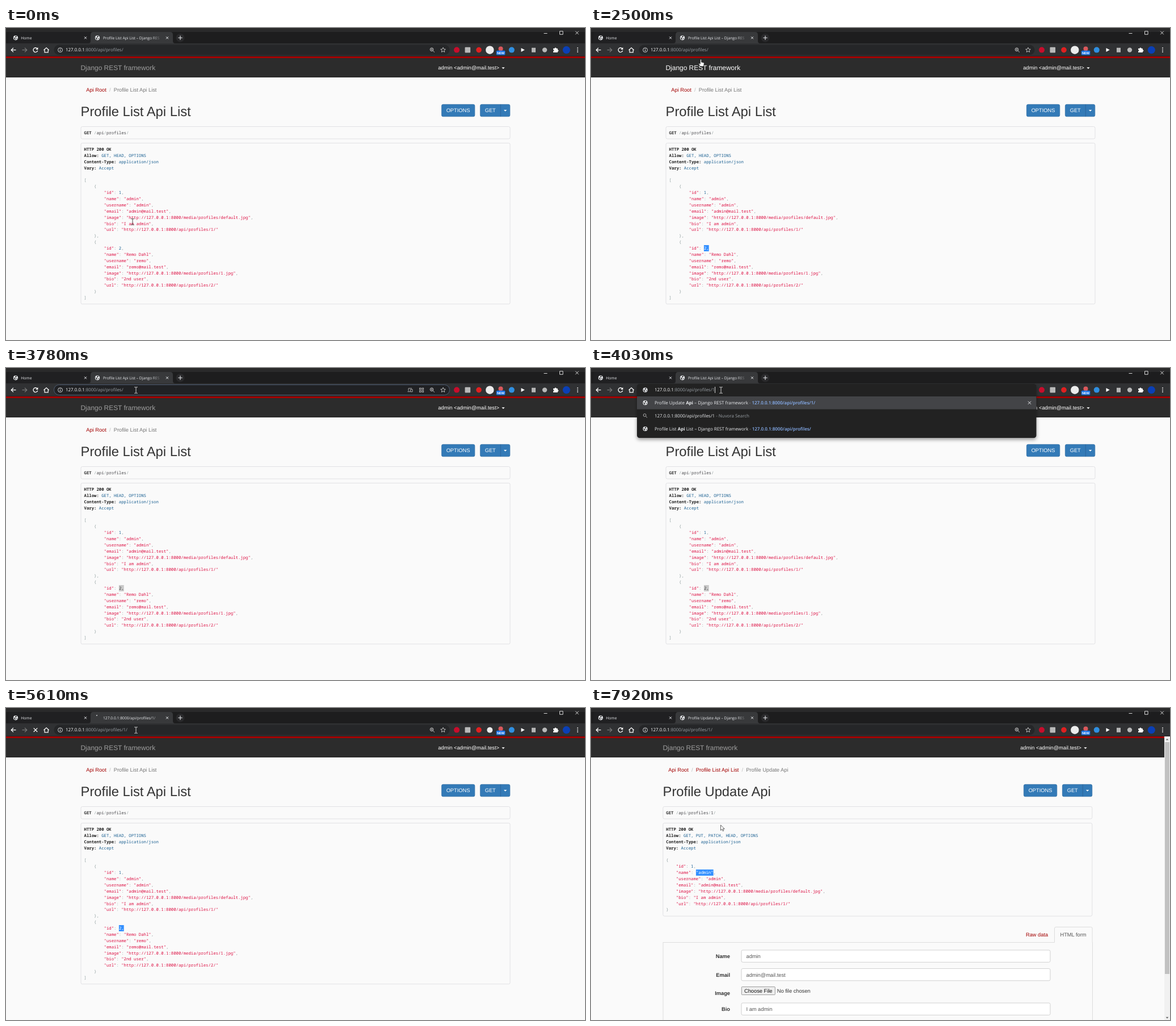
These frames come from a looping animation (1020 px wide and 549 px high, 8 s). An HTML page:

```html
<!DOCTYPE html>
<html lang="en">
<head>
<meta charset="utf-8">
<title>Profile API</title>
<style>
  html, body { margin: 0; width: 100%; height: 100%; overflow: hidden; background: #fafafa; }
  svg { display: block; width: 100%; height: 100%; }
  text { white-space: pre; text-rendering: geometricPrecision; }
  .page { font-family: "Liberation Sans", Arial, sans-serif; }
  .ui { font-family: "Open Sans", "Noto Sans", sans-serif; }
  .code { font-family: "Noto Sans Mono", "DejaVu Sans Mono", monospace; font-size: 7.31px; }
</style>
</head>
<body>
<svg id="stage" viewBox="0 0 1020 549">
  <defs>
    <linearGradient id="fade" gradientUnits="userSpaceOnUse" x1="256" x2="275" y1="0" y2="0">
      <stop offset="0" stop-color="#e8eaed"/>
      <stop offset="1" stop-color="#e8eaed" stop-opacity="0"/>
    </linearGradient>
    <filter id="shadow" x="-5%" y="-20%" width="110%" height="150%">
      <feDropShadow dx="0" dy="3" stdDeviation="3" flood-color="#000" flood-opacity=".4"/>
    </filter>
  </defs>
</svg>
<script>
const LOOP = 8000, CHAR = 4.386, LINE = 10.87;
const RED = '#a30000', BLUE = '#337ab7', INK = '#333', PALE = '#e8eaed', GREY = '#9aa0a6';
const HOST = '127.0.0.1', LIST = ':8000/api/profiles/';
const stage = document.getElementById('stage');

function add(parent, tag, attrs = {}, content) {
  const node = document.createElementNS('http://www.w3.org/2000/svg', tag);
  for (const k in attrs) node.setAttribute(k, attrs[k]);
  if (content !== undefined) node.textContent = content;
  return parent.appendChild(node);
}
const group = (parent, attrs) => add(parent, 'g', attrs);
const rect = (g, x, y, width, height, fill, more) =>
  add(g, 'rect', { x, y, width, height, fill, ...more });
const circle = (g, cx, cy, r, fill, more) => add(g, 'circle', { cx, cy, r, fill, ...more });
const fillPath = (g, d, fill) => add(g, 'path', { d, fill });
const line = (g, d, stroke = PALE, width = 1) =>
  add(g, 'path', { d, stroke, fill: 'none', 'stroke-width': width });
const label = (g, cls, x, y, size, fill, str, more) =>
  add(g, 'text', { class: cls, x, y, 'font-size': size, fill, ...more }, str);

// parts: [string, colour, weight]
function rich(g, cls, x, y, size, parts) {
  const t = label(g, cls, x, y, size, INK, '');
  for (const [str, fill, weight = 400] of parts) add(t, 'tspan', { fill, 'font-weight': weight }, str);
  return t;
}
const address = (g, x, path) => rich(g, 'ui', x, 41.2, 7.95, [[HOST, '#fff'], [path, GREY]]);
const cross = (g, x, y, r, color = PALE, w = 1) =>
  line(g, `M${x - r} ${y - r}l${2 * r} ${2 * r}m0 ${-2 * r}l${-2 * r} ${2 * r}`, color, w);

function globe(g, x, y) {
  circle(g, x, y, 4.1, PALE);
  fillPath(g, `M${x - 3.4} ${y - 1}l2.2 1.2l1.2 1.4l-.6 1.6l-1.4-.6zM${x} ${y - 3.5}l2.2 1l-1.6 2l-1.8-.4zM${x + 1} ${y + .6}l2 0l-1 2z`, '#333');
}

/* ---------- page content ---------- */
const lineY = i => 216.1 + i * LINE;

function jsonParts(str) {
  return str.match(/\s+|"[^"]*"|\d+|[^\s"\d]+/g).map(s =>
    [s, s[0] === '"' ? '#dd1144' : /\d/.test(s) ? '#195f91' : '#93a1a1']);
}

function panel(g, x, y, h) {
  rect(g, x + .5, y + .5, 756, h, '#fafafa', { rx: 2.5, stroke: '#e1e1e4' });
}

function response(g, x, path, allow, data) {
  panel(g, x - 6, 173, 21.5);
  const words = path.split(/(\/)/).filter(Boolean).map(s => [s, s === '/' ? '#93a1a1' : '#48484c']);
  rich(g, 'code', x, 186.8, 7.31, [['GET ', INK, 700], ...words]);
  const json = JSON.stringify(data, null, 4).split('\n');
  panel(g, x - 6, 202, (json.length + 5) * LINE + 11.5);
  label(g, 'code', x, lineY(0), 7.31, '#222', 'HTTP 200 OK', { 'font-weight': 700 });
  [['Allow:', allow], ['Content-Type:', 'application/json'], ['Vary:', 'Accept']].forEach(([k, v], i) =>
    rich(g, 'code', x, lineY(i + 1), 7.31, [[k + ' ', '#222', 700], [v, '#195f91']]));
  json.forEach((s, i) => rich(g, 'code', x, lineY(i + 5), 7.31, jsonParts(s)));
}

const caretDown = (g, x, y) => fillPath(g, `M${x - 2.7} ${y - 1.2}h5.4l-2.7 2.7z`, '#fff');

// Everything shared by both pages; dx is the shift caused by the scrollbar.
function basePage(dx, title, crumbs) {
  const g = group(stage);
  rect(g, 0, 50, 1020, 499, '#fafafa');
  rect(g, 0, 50, 1020, 37, '#2c2c2c');
  rect(g, 0, 49.5, 1020, 3.5, RED);
  const brand = label(g, 'page', 131.5 + dx, 74.2, 11.93, '#9d9d9d', 'Django REST framework');
  label(g, 'page', 869 + dx, 73.2, 9.27, '#fff', 'admin <admin@mail.test>', { 'text-anchor': 'end' });
  caretDown(g, 876 + dx, 70.5);
  const parts = [];
  crumbs.forEach((c, i) => {
    if (i) parts.push(['  /  ', '#bbb']);
    parts.push([c, i < crumbs.length - 1 ? RED : '#777']);
  });
  rich(g, 'page', 141.3 + dx, 111.6, 9.27, parts);
  label(g, 'page', 131.6 + dx, 155.2, 23.75, INK, title);
  const border = { rx: 2.6, stroke: '#2e6da4', 'stroke-width': .7 };
  rect(g, 767.4 + dx, 134.4, 58.4, 21.4, BLUE, border);
  rect(g, 835.4 + dx, 134.4, 52.4, 21.4, BLUE, border);
  line(g, `M${871.3 + dx} 134.5v21.2`, '#2a5f90', .7);
  label(g, 'page', 796.5 + dx, 148.2, 9.27, '#fff', 'OPTIONS', { 'text-anchor': 'middle' });
  label(g, 'page', 843.7 + dx, 148.2, 9.27, '#fff', 'GET');
  caretDown(g, 879.6 + dx, 145.3);
  return { g, brand };
}

const base = 'http://127.0.0.1:8000/';
const profile = (id, name, username, image, bio) => ({
  id, name, username, email: username + '@mail.test',
  image: `${base}media/profiles/${image}.jpg`, bio, url: `${base}api/profiles/${id}/`
});
const admin = profile(1, 'admin', 'admin', 'default', 'I am admin');
const other = profile(2, 'Remo Dahl', 'remo', '1', '2nd user');

const { g: listPage, brand } = basePage(0, 'Profile List Api List', ['Api Root', 'Profile List Api List']);
response(listPage, 137.5, '/api/profiles/', 'GET, HEAD, OPTIONS', [admin, other]);

const { g: editPage } = basePage(-5, 'Profile Update Api', ['Api Root', 'Profile List Api List', 'Profile Update Api']);
response(editPage, 132.3, '/api/profiles/1/', 'GET, PUT, PATCH, HEAD, OPTIONS', admin);

(function form(g) {
  rect(g, 127, 412.5, 756.5, 160, '#fafafa', { stroke: '#ddd' });
  fillPath(g, 'M816.5 413.5V388q0-2.6 2.6-2.6h61.4q2.6 0 2.6 2.6v25.5z', '#fafafa');
  line(g, 'M816.5 412.5V388q0-2.6 2.6-2.6h61.4q2.6 0 2.6 2.6v24.5', '#ddd');
  label(g, 'page', 766, 402, 9.27, RED, 'Raw data');
  label(g, 'page', 826.5, 402, 9.27, '#555', 'HTML form');
  [['Name', 440, admin.name], ['Email', 472.5, admin.email], ['Image', 505], ['Bio', 533, admin.bio]].forEach(([k, y, v]) => {
    label(g, 'page', 245, y, 9.27, INK, k, { 'text-anchor': 'end', 'font-weight': 700 });
    if (!v) return;
    rect(g, 265, y - 14, 544, 21.3, '#fff', { rx: 2.4, stroke: '#ccc', 'stroke-width': .9 });
    label(g, 'page', 273.5, y, 9.27, '#555', v);
  });
  rect(g, 265.3, 490.6, 59, 14, '#efefef', { rx: 1, stroke: '#767676', 'stroke-width': .7 });
  label(g, 'page', 270, 500.8, 9.27, '#111', 'Choose File');
  label(g, 'page', 327.8, 500.8, 9.27, INK, 'No file chosen');
  rect(g, 1010, 50, 10, 499, '#f1f1f1');
  rect(g, 1011, 60, 8, 408, '#c1c1c1');
  fillPath(g, 'M1012.6 56.5h4.8l-2.4-2.6z', '#666');
  fillPath(g, 'M1012.6 543.8h4.8l-2.4 2.6z', '#666');
})(editPage);

const mark = group(stage);
const markBox = rect(mark, 0, 0, 0, LINE, '#3390ff');
const markText = label(mark, 'code', 0, 0, 7.31, '#fff', '');

/* ---------- browser frame ---------- */
const frame = group(stage);
rect(frame, 0, 0, 1020, 50, '#1d1d1e');
rect(frame, 0, 0, 1020, 7, '#2a2a2b');
fillPath(frame, 'M4 27V12q0-5 5-5h135q5 0 5 5v15z', '#202022');
fillPath(frame, 'M145 27q4 0 4-4V12q0-5 5-5h135q5 0 5 5v11q0 4 4 4z', '#38393b');
rect(frame, 0, 27, 1020, 22.5, '#303133');
globe(frame, 17, 17.3);
label(frame, 'ui', 26.3, 19.7, 6.75, PALE, 'Home');
cross(frame, 140, 17.3, 2);
cross(frame, 284, 17.3, 2);
circle(frame, 307, 17.3, 7.5, '#29292b');
line(frame, 'M303.3 17.3h7.4M307 13.6v7.4', PALE, 1.1);
line(frame, 'M947.5 9.5h6M975.5 5.7h5.6v5.6h-5.6z', '#eee', .9);
cross(frame, 1006, 8.5, 2.8, '#eee', .9);

line(frame, 'M17.5 38.7h-8M13 35l-3.8 3.7l3.8 3.7', '#fff', 1.3);
line(frame, 'M28.5 38.7h8M33 35l3.8 3.7l-3.8 3.7', '#777', 1.3);
line(frame, 'M66.5 39l4.6-4.2l4.6 4.2M68 38.2v4.6h6.2v-4.6', '#fff', 1.2);
const bar = rect(frame, 84.5, 29.5, 697, 18, '#252628', { rx: 9 });

const reload = group(frame);
line(reload, 'M55 36.2A3.9 3.9 0 1 0 55.7 39.8', '#fff', 1.3);
fillPath(reload, 'M56.4 33.9v4.1h-4.1z', '#fff');
const stop = cross(frame, 52, 38.7, 3.3, '#fff', 1.2);

const site = group(frame);
circle(site, 95.5, 38.7, 3.9, 'none', { stroke: PALE, 'stroke-width': .9 });
line(site, 'M95.5 37.9v3M95.5 36.1v1', PALE, 1);
const hot = rect(site, 104.6, 33.3, 102.6, 10.9, '#4a78c8');
const url = address(site, 105, LIST);
const icons = group(site);
circle(icons, 750, 37.8, 2.8, 'none', { stroke: '#ccc' });
line(icons, 'M752.2 40l2.8 2.8M748.6 37.8h2.8M750 36.4v2.8', '#ccc', .9);
line(icons, 'M770 34.3l1.3 2.8l3 .3l-2.3 2l.7 3l-2.7-1.6l-2.7 1.6l.7-3l-2.3-2l3-.3z', '#ccc', .9);
const tools = group(site);
line(tools, 'M715 35.8h-6v4.6M707.5 41.6h4.5M712.6 37.6h3.4v4.2h-3.4z', '#bbb', .9);
for (const [x, y] of [[728.5, 35.3], [733, 35.3], [728.5, 39.8], [733, 39.8]])
  rect(tools, x, y, 2.6, 2.6, 'none', { stroke: '#bbb', 'stroke-width': .9 });

circle(frame, 794, 38.6, 5, '#c70d2c');
rect(frame, 808.5, 33.8, 9.6, 9.6, '#b9b9b9', { rx: 1 });
circle(frame, 833, 38.6, 4.8, '#e02020');
const disc = circle(frame, 852.3, 38.7, 7.2, '#ececec');
circle(frame, 871.5, 36.4, 4, '#d9585c');
rect(frame, 863.8, 39.8, 15.6, 7.6, '#1a73e8', { rx: 1.5 });
label(frame, 'page', 871.6, 45.9, 5.6, '#fff', 'NEW', { 'text-anchor': 'middle', 'font-weight': 700 });
circle(frame, 890.8, 38.6, 5, '#2f8fe0');
fillPath(frame, 'M907.5 35.2l6.3 3.4l-6.3 3.4z', '#fff');
rect(frame, 926, 34.8, 7, 8, '#b5b5b5');
circle(frame, 949, 38.6, 4.2, '#b9b9b9');
fillPath(frame, 'M964 36h2.4a1.6 1.6 0 0 1 3.2 0h2.2v2.2a1.6 1.6 0 0 1 0 3.2v1.6h-7.8v-2.2a1.3 1.3 0 0 0 0-2.6z', '#fff');
circle(frame, 987.3, 38.6, 6.6, '#0b3fb5');
for (const y of [35.3, 38.7, 42.1]) circle(frame, 1007, y, 1, '#eee');

const tabGlobe = group(frame);
globe(tabGlobe, 161, 17.3);
const spinner = line(frame, 'M159 13.4q1-.5 2-.5', PALE, 1.2);
const tabText = label(frame, 'ui', 171, 19.7, 6.73, 'url(#fade)', '');

/* ---------- suggestions ---------- */
const drop = group(stage);
const sheet = rect(drop, 81, 28, 703.5, 72, '#202124', { rx: 4.5, filter: 'url(#shadow)' });
rect(drop, 81, 50, 703.5, 22.6, '#434447');
globe(drop, 95.5, 38.7);
globe(drop, 95.5, 61.2);
const typed = group(drop), search = group(drop), third = group(drop);
const suggestion = (g, y, head, tail, path) => rich(g, 'ui', 112, y, 7.95,
  [[head, PALE], ['Api', PALE, 700], [tail + ' – Django REST framework', PALE], [' - ', GREY], [HOST + path, '#8ab4f8', 600]]);
suggestion(drop, 63.8, 'Profile Update ', '', LIST + '1/');
cross(drop, 772.5, 61.2, 2.6);
circle(drop, 94.6, 83, 2.4, 'none', { stroke: '#bbb', 'stroke-width': .9 });
line(drop, 'M96.4 84.8l2.6 2.6', '#bbb');
globe(third, 95.5, 107);
suggestion(third, 109.6, 'Profile List ', ' List', LIST);

const caret = rect(stage, 0, 33, .8, 11, '#fff');

/* ---------- pointer ---------- */
const pointer = group(stage);
const shapes = { beam: group(pointer), arrow: group(pointer), hand: group(pointer) };
const beamLine = line(shapes.beam, 'M-2.8-5.3h2l.8.6l.8-.6h2M0-4.8v9.6M-2.8 5.3h2l.8-.6l.8.6h2', '#444', .95);
add(shapes.arrow, 'path', { d: 'M0 0v9.3l2.2-2l1.6 3.3l1.5-.7l-1.5-3.2h3z', fill: '#fff', stroke: '#222', 'stroke-width': .7 });
add(shapes.hand, 'path', {
  d: 'M-1.6-6.2q1.3-1.2 2 0V-2l4 1q1 .4.8 1.6L4.4 5.6H-1.4L-4.2 1.2q.2-1.4 1.6-.6l1 .8z',
  fill: '#fff', stroke: '#222', 'stroke-width': .7
});

const moves = [
  [0, 'beam', 223, 341], [140, 'beam', 207, 306], [270, 'beam', 198.5, 292],
  [540, 'beam', 208, 314], [670, 'beam', 198.5, 290], [840, 'beam', 202, 310],
  [960, 'beam', 207, 335], [1080, 'beam', 211, 360], [1200, 'beam', 213, 380],
  [1320, 'beam', 211, 385], [1600, 'beam', 206, 386], [1720, 'beam', 201, 386],
  [2010, 'beam', 208, 370], [2130, 'beam', 224, 290], [2250, 'arrow', 217, 200],
  [2380, 'arrow', 203, 98], [2500, 'hand', 194, 62], [2650, 'beam', 212, 46],
  [2770, 'beam', 226, 39], [2910, 'beam', 229, 39], [6270, 'arrow', 219, 110],
  [6390, 'arrow', 204, 206], [6510, 'arrow', 170, 273], [6630, 'arrow', 168, 272],
  [6750, 'arrow', 170, 271], [6900, 'arrow', 169, 270.5], [7050, 'beam', 182, 279],
  [7170, 'arrow', 168, 274], [7310, 'beam', 186, 290], [7430, 'beam', 196, 290],
  [7550, 'beam', 207, 290], [7670, 'beam', 216, 290], [7920, 'arrow', 228.5, 206]
];
// [time, left edge, column, row, text, focused]
const marks = [
  [0, 0, 0, 0, ''], [1600, 137.5, 15, 16, ',', true], [1870, 137.5, 14, 16, '2,', true],
  [2910, 137.5, 14, 16, '2,', false], [5610, 137.5, 14, 16, '2,', true], [5850, 0, 0, 0, ''],
  [7430, 132.3, 12, 7, '"ad', true], [7550, 132.3, 12, 7, '"admi', true], [7670, 132.3, 12, 7, '"admin"', true]
];
const carets = [[0, 0], [3150, 207.2], [3780, 0], [4030, 218.2], [4560, 0], [4940, 221.8], [5610, 0]];

const at = (table, t) => table.findLast(row => row[0] <= t);
const show = (node, on) => node.setAttribute('display', on ? 'inline' : 'none');
const set = (node, attrs) => { for (const k in attrs) node.setAttribute(k, attrs[k]); };

function fillAddress(path) {
  typed.replaceChildren();
  search.replaceChildren();
  address(typed, 112, path);
  rich(search, 'ui', 112, 86.7, 7.95, [[HOST + path, PALE], [' - Nuvora Search', GREY]]);
}

let lastPath;
function render(t) {
  const focused = t >= 2910 && t < 5610, open = t >= 4030 && t < 5610;
  const loading = t >= 5610 && t < 5980, loaded = t >= 5850;
  show(listPage, !loaded);
  show(editPage, loaded);
  set(brand, { fill: t >= 2500 && t < 2650 ? '#fff' : '#9d9d9d' });

  set(bar, { fill: focused ? '#202124' : '#252628', stroke: focused ? '#4d5a70' : 'none' });
  show(hot, t >= 2910 && t < 3150);
  show(tools, focused);
  show(reload, !loading);
  show(stop, loading);
  show(tabGlobe, !loading);
  show(spinner, loading);
  set(disc, { r: loading ? 5 : 7.2 });
  url.lastChild.textContent = LIST + (t >= 5610 ? '1/' : '');
  tabText.textContent = loaded ? 'Profile Update Api – Django RES'
    : loading ? HOST + LIST + '1/' : 'Profile List Api List – Django RES';

  show(drop, open);
  const path = LIST + (t < 4940 ? '1' : '1/');
  if (path !== lastPath) fillAddress(lastPath = path);
  show(third, t < 4940);
  set(sheet, { height: t < 4940 ? 95 : 72 });
  const cx = at(carets, t)[1];
  show(caret, cx);
  set(caret, { x: cx });

  const [, left, col, row, str, active] = at(marks, t);
  const x = left + col * CHAR;
  show(mark, str);
  set(markBox, { x, y: lineY(row) - 8, width: str.length * CHAR, fill: active ? '#3390ff' : '#c8c8c8' });
  set(markText, { x, y: lineY(row), fill: active ? '#fff' : '#444' });
  markText.textContent = str;

  const [, kind, px, py] = at(moves, t);
  for (const k in shapes) show(shapes[k], k === kind);
  set(pointer, { transform: `translate(${px} ${py})` });
  set(beamLine, { stroke: py < 87 ? '#ddd' : '#444' });
}

const start = performance.now();
function tick() {
  render((performance.now() - start) % LOOP);
  requestAnimationFrame(tick);
}
render(0);
requestAnimationFrame(tick);
</script>
</body>
</html>
```
